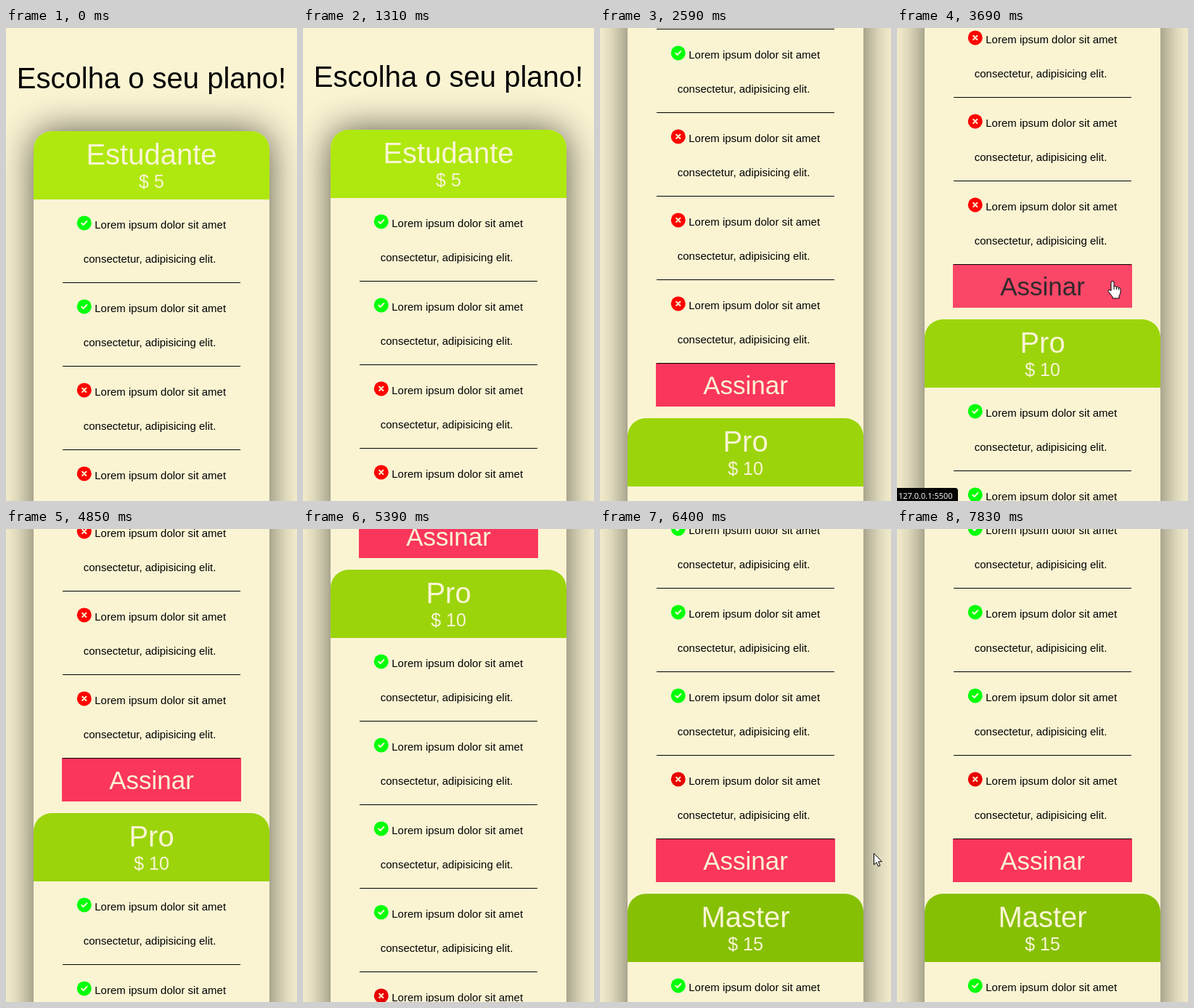
Recreate the animation shown at these times as an HTML page with a canvas. Size 401 by 651 pixels, loop 8 s.

```html
<!DOCTYPE html>
<html lang="pt">
<head>
<meta charset="utf-8">
<title>Planos</title>
<style>
html, body { margin: 0; width: 100%; height: 100%; overflow: hidden; background: #faf4d3; }
canvas { display: block; }
</style>
</head>
<body>
<canvas id="stage" width="401" height="651"></canvas>
<script>
const ctx = document.getElementById('stage').getContext('2d');
const W = 401, H = 651, LOOP = 8000, MID = 200.5;
const CREAM = '#faf4d3', ARIAL = '"Liberation Sans", Arial, sans-serif';
const ROW = 115, HEAD = 94, CARD_STEP = 744, FIRST_TOP = 142;

const plans = [
  { name: 'Estudante', price: '$ 5', color: '#afe80f', checks: 2, cross: '#ff0000' },
  { name: 'Pro', price: '$ 10', color: '#9bd40b', checks: 4, cross: '#e80000' },
  { name: 'Master', price: '$ 15', color: '#86c005', checks: 5, cross: '#e80000' }
];

// Keys are [time, value, ...]
const scrollKeys = [[1250, 0], [1760, 85], [2590, 349], [3030, 485],
                    [4720, 485], [5390, 830], [6210, 1128]];
const visits = [
  { path: [[3060, 404, 430], [3690, 297, 348], [3830, 297, 348], [3950, 298, 350], [4300, 404, 274]],
    fadeIn: 3350, fadeOut: 4080, status: [3450, 4500], plan: 0 },
  { path: [[6400, 377, 446], [6800, 290, 458], [7240, 285, 460], [7560, 404, 405]],
    fadeIn: 6600, fadeOut: 7370, status: [6680, 7760], plan: 1 }
];
const FADE = 300;

const beats = [0, 1310, 1760, 2590, 3690, 5390, 6400, 7830, LOOP];

const arrow = new Path2D('M.5 .5V16L4 12.7L6.5 18.3L9 17.2L6.6 11.8H11.5Z');
const hand = new Path2D('M-2 14V2Q-2 .5 0 .5T2 2V8Q4 6.5 5.5 8.5Q7.5 7.5 8.5 9.5' +
  'Q11 9 11 11.5V16Q11 18 9 20.5V24H0V22L-6 14.5Q-6.5 12 -4 12Z');

const clamp = x => Math.max(0, Math.min(1, x));
const mix = (a, b, k) => `rgb(${a.map((v, i) => Math.round(v + (b[i] - v) * k))})`;

function stepTime(t) {
  const i = beats.findIndex(b => b > t) - 1;
  const span = beats[i + 1] - beats[i];
  const step = span / Math.round(span / 66);
  return beats[i] + Math.floor((t - beats[i]) / step + 1e-6) * step;
}

function slope(keys, i, c) {
  const a = keys[i - 1], k = keys[i], b = keys[i + 1];
  if (!a || !b || (k[c] - a[c]) * (b[c] - k[c]) <= 0) return 0;
  return (b[c] - a[c]) / (b[0] - a[0]);
}

// Smooth curve through the keys, flat at rests and turns
function curve(keys, t, c = 1) {
  const i = keys.findIndex(k => k[0] > t);
  if (i === 0) return keys[0][c];
  if (i < 0) return keys[keys.length - 1][c];
  const a = keys[i - 1], b = keys[i], d = b[0] - a[0], u = (t - a[0]) / d;
  const v = 1 - u;
  return a[c] * (1 + 2 * u) * v * v + b[c] * u * u * (3 - 2 * u) +
    d * u * v * (slope(keys, i - 1, c) * v - slope(keys, i, c) * u);
}

function text(str, x, y, size, color, align = 'center', family = ARIAL) {
  ctx.font = `${size}px ${family}`;
  ctx.fillStyle = color;
  ctx.textAlign = align;
  ctx.fillText(str, x, y);
}

function roundTop(x, y, w, h, r, color) {
  ctx.fillStyle = color;
  ctx.beginPath();
  ctx.roundRect(x, y, w, h, r);
  ctx.fill();
}

function icon(y, checked, color) {
  ctx.save();
  ctx.translate(107.8, y);
  ctx.fillStyle = color;
  ctx.beginPath();
  ctx.arc(0, 0, 10, 0, 7);
  ctx.fill();
  ctx.strokeStyle = CREAM;
  ctx.lineWidth = 2;
  ctx.lineCap = ctx.lineJoin = 'round';
  ctx.stroke(new Path2D(checked ? 'M-3.6 .2L-1.2 2.6L3.6 -2.4' : 'M-2.6 -2.6L2.6 2.6M2.6 -2.6L-2.6 2.6'));
  ctx.restore();
}

function drawPlan(plan, top, hover) {
  roundTop(38, top, 325, HEAD, [25, 25, 0, 0], plan.color);
  text(plan.name, MID, top + 46, 40, CREAM);
  text(plan.price, MID, top + 78, 25, CREAM);

  const button = top + 668;
  ctx.fillStyle = mix([250, 54, 92], [250, 71, 103], hover);
  ctx.fillRect(77, button, 247, 60);
  text('Assinar', MID, button + 43, 35, mix([250, 244, 211], [48, 42, 44], hover));

  for (let i = 0; i < 5; i++) {
    const y = top + HEAD + i * ROW, checked = i < plan.checks;
    icon(y + 32.4, checked, checked ? '#00ff08' : plan.cross);
    text('Lorem ipsum dolor sit amet', 122.2, y + 40, 15, '#000', 'left');
    text('consectetur, adipisicing elit.', 106.7, y + 87, 15, '#000', 'left');
    ctx.fillStyle = '#000';
    ctx.fillRect(78, y + 114, 245, 1);
  }
}

function drawContainer(top) {
  const y = Math.max(top, -200);
  ctx.save();
  ctx.shadowColor = 'rgba(0,0,0,.65)';
  ctx.shadowBlur = 50;
  roundTop(38, y, 325, 900 - y, [25, 25, 0, 0], CREAM);
  ctx.restore();
}

function drawPointer(x, y, isHand) {
  const shape = isHand ? hand : arrow;
  ctx.save();
  ctx.translate(x, y);
  ctx.fillStyle = '#fff';
  ctx.strokeStyle = '#000';
  ctx.lineWidth = 1;
  ctx.lineJoin = 'round';
  ctx.fill(shape);
  ctx.stroke(shape);
  if (isHand) ctx.stroke(new Path2D('M2 8V12M5.5 8.5V12M8.5 9.5V12.5'));
  ctx.restore();
}

function draw(t) {
  const scroll = Math.round(curve(scrollKeys, t));
  ctx.fillStyle = CREAM;
  ctx.fillRect(0, 0, W, H);
  drawContainer(FIRST_TOP - scroll);
  text('Escolha o seu plano!', MID, 83 - scroll, 40, '#000');

  plans.forEach((plan, i) => {
    const top = FIRST_TOP + i * CARD_STEP - scroll;
    const v = visits.find(v => v.plan === i);
    const hover = v ? clamp((t - v.fadeIn) / FADE) - clamp((t - v.fadeOut) / FADE) : 0;
    if (top < H && top + CARD_STEP > 0) drawPlan(plan, top, hover);
  });

  for (const { path, status, plan } of visits) {
    if (t >= status[0] && t < status[1]) {
      roundTop(0, 633, 84, 18, [0, 4, 0, 0], '#050505');
      text('127.0.0.1:5500', 2, 647.5, 11, '#fff', 'left', '"Open Sans", sans-serif');
    }
    if (t >= path[0][0] && t < path[path.length - 1][0]) {
      const x = curve(path, t, 1), y = curve(path, t, 2);
      const button = FIRST_TOP + plan * CARD_STEP + 668 - scroll;
      drawPointer(Math.round(x), Math.round(y), x > 77 && x < 324 && y > button && y < button + 60);
    }
  }
}

function frame() {
  draw(stepTime(performance.now() % LOOP));
  requestAnimationFrame(frame);
}
frame();
</script>
</body>
</html>
```
